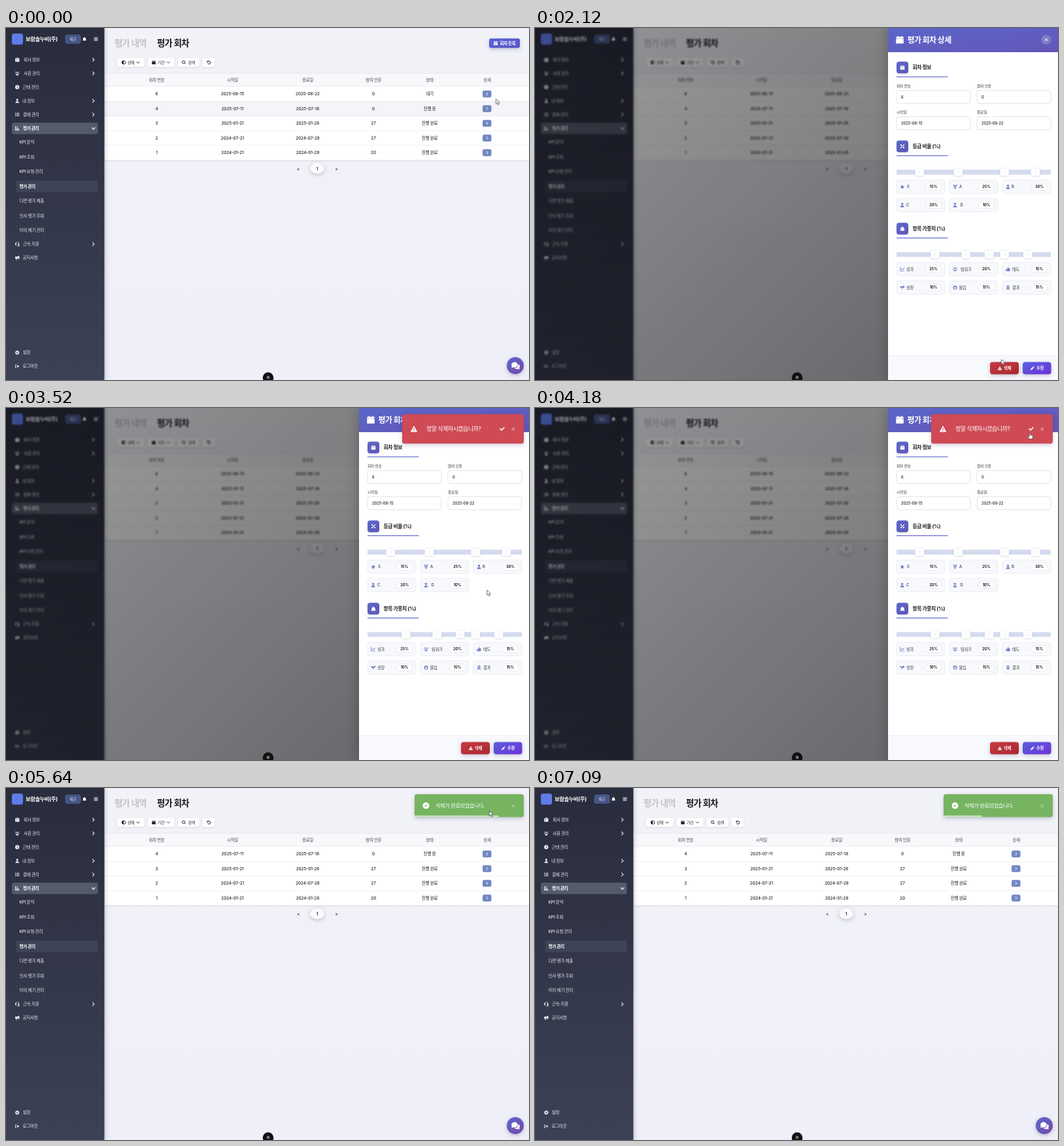
An HTML page that plays this animation: 800x539 px, repeating every 7.12 s.

```html
<!DOCTYPE html>
<html lang="ko">
<head>
<meta charset="utf-8">
<title>평가 회차</title>
<style>
html, body { margin: 0; width: 100%; height: 100%; overflow: hidden; background: #f0f1f8; }
#stage { position: relative; width: 800px; height: 539px; overflow: hidden; }
#stage > * { position: absolute; left: 0; top: 0; width: 800px; height: 539px; }
svg { display: block; overflow: visible; }
text { font-family: Inter, "Noto Sans CJK KR", "Noto Sans CJK", sans-serif; white-space: pre; }
text.ko { letter-spacing: -.05em; }
.soft { filter: drop-shadow(0 1px 1.5px rgba(40, 45, 80, .12)); }
.lift { filter: drop-shadow(0 2px 3px rgba(40, 45, 80, .25)); }

#shade {
  background: linear-gradient(135deg, rgba(0, 0, 0, .38), rgba(0, 0, 0, .6));
  backdrop-filter: blur(1.25px);
}
#shade, #drawer, #ask, #done, #cursor, #before, #after, #rowHover, #del, #bar, .arrow, .hand {
  animation: 7120ms linear infinite;
}
#shade { animation-name: shade; }
#drawer { animation-name: drawer; }
#ask { animation-name: ask; }
#done { animation-name: done; }
#ask, #done { animation-timing-function: cubic-bezier(.215, .61, .355, 1); }
#bar { animation-name: bar; transform-origin: 625px 0; }
#cursor { animation-name: cursor; animation-timing-function: ease-in-out; }
#before { animation-name: before; }
#after { animation-name: after; }
#rowHover { animation-name: rowHover; }
#del { animation-name: del; }
.arrow { animation-name: arrow; }
.hand { animation-name: hand; }
#before, #after, #rowHover, .arrow, .hand { animation-timing-function: step-end; }

@keyframes shade {
  0%, 2% { opacity: 0; }
  8%, 59.6% { opacity: 1; }
  64.4%, 100% { opacity: 0; }
}
@keyframes drawer {
  0%, 2% { transform: translateX(290px); animation-timing-function: cubic-bezier(.2, .7, .3, 1); }
  8.6%, 59.6% { transform: none; animation-timing-function: ease; }
  64.9%, 100% { transform: translateX(290px); }
}
@keyframes ask {
  0%, 34.3% { opacity: 0; transform: translateX(1250px); }
  40.6% { opacity: 1; transform: translateX(-10.4px); }
  42.15% { transform: translateX(4.2px); }
  43.75% { transform: translateX(-2.1px); }
  44.8%, 59% { opacity: 1; transform: none; animation-timing-function: ease; }
  61.1% { opacity: 1; transform: translateX(-8.3px); animation-timing-function: ease; }
  69.5%, 100% { opacity: 0; transform: translateX(833px); }
}
@keyframes done {
  0%, 64.55% { opacity: 0; transform: translateX(1250px); }
  70.9% { opacity: 1; transform: translateX(-10.4px); }
  72.45% { transform: translateX(4.2px); }
  74.05% { transform: translateX(-2.1px); }
  75.1%, 100% { opacity: 1; transform: none; }
}
@keyframes bar {
  0%, 68.1% { transform: none; }
  100% { transform: scaleX(.344); }
}
@keyframes cursor {
  0% { transform: translate(749.5px, 108.5px); }
  1.5%, 17.4% { transform: translate(736px, 99px); }
  29.8% { transform: translate(713.5px, 507.5px); }
  32.5%, 42% { transform: translate(715px, 514px); }
  57%, 58.8% { transform: translate(757px, 38px); }
  61%, 70% { transform: translate(757px, 36px); }
  79.2% { transform: translate(739.5px, 35px); }
  84.5%, 100% { transform: translate(733px, -14px); }
}
@keyframes before { 0% { visibility: visible; } 64.6%, 100% { visibility: hidden; } }
@keyframes after { 0% { visibility: hidden; } 64.6%, 100% { visibility: visible; } }
@keyframes rowHover { 0% { visibility: visible; } 1%, 100% { visibility: hidden; } }
@keyframes del { 0%, 31.5% { transform: none; } 33%, 43% { transform: translateY(-1px); } 44.5%, 100% { transform: none; } }
@keyframes arrow {
  0% { visibility: visible; } 1.2% { visibility: hidden; } 3% { visibility: visible; }
  32% { visibility: hidden; } 43% { visibility: visible; }
  55.5% { visibility: hidden; } 72%, 100% { visibility: visible; }
}
@keyframes hand {
  0% { visibility: hidden; } 1.2% { visibility: visible; } 3% { visibility: hidden; }
  32% { visibility: visible; } 43% { visibility: hidden; }
  55.5% { visibility: visible; } 72%, 100% { visibility: hidden; }
}
</style>
</head>
<body>
<div id="stage"></div>
<script>
// Icons live in a 10 x 10 box, filled even-odd.
const disc = (x, y, r) => `M${x} ${y - r}a${r} ${r} 0 1 1 0 ${2 * r}a${r} ${r} 0 1 1 0 ${-2 * r}z`;
const ICONS = {
  office: 'M0 2h4V0h3v2h3v8H0zM2 4v1h1.4V4zM2 7v1h1.4V7zM5 4v1h1.4V4z',
  users: disc(5, 3.2, 1.7) + disc(1.6, 2, 1.2) + disc(8.4, 2, 1.2) + 'M1.8 9.5a3.2 3.6 0 0 1 6.4 0zM0 6a1.8 1.8 0 0 1 2.8-1.6L1.6 6.2zM10 6a1.8 1.8 0 0 0-2.8-1.6l1.2 1.8z',
  clock: disc(5, 5, 5) + 'M4.4 2v3.4l2.2 1.5.6-.9-1.7-1.2V2z',
  user: disc(5, 2.5, 2.5) + 'M.7 10a4.3 4.3 0 0 1 8.6 0z',
  tasks: 'M0 .8h2v2H0zM3.5 1.1H10v1.4H3.5zM0 4h2v2H0zM3.5 4.3H10v1.4H3.5zM0 7.2h2v2H0zM3.5 7.5H10v1.4H3.5z',
  chart: 'M0 0h1.5v8.5H10V10H0zM3 1.5h4v1.3H3zM3 4h2.5v1.3H3zM3 6.3h6v1.3H3z',
  headset: 'M5 0a5 5 0 0 0-5 5v2.5h3v-4H1.6a3.5 3.5 0 0 1 6.8 0H7v4h1.5v1H5V10h5V5a5 5 0 0 0-5-5z',
  horn: 'M10 0v8L5 6H3.5l.8 4H2L1.3 6H0V2h5z',
  gear: 'M4 0h2l.4 1.6 1.5-.9 1.4 1.4-.9 1.5L10 4v2l-1.6.4.9 1.5-1.4 1.4-1.5-.9L6 10H4l-.4-1.6-1.5.9L.7 7.9l.9-1.5L0 6V4l1.6-.4L.7 2.1 2.1.7l1.5.9z' + disc(5, 5, 1.7),
  exit: 'M0 1h4v1.4H1.4v5.2H4V9H0zM3.5 4h3V1.8L10 5 6.5 8.2V6h-3z',
  bell: 'M4.4 0h1.2v1A3.2 3.2 0 0 1 8.3 4v2.2L9.5 8H.5l1.2-1.8V4A3.2 3.2 0 0 1 4.4 1zM3.7 8.6h2.6a1.3 1.3 0 0 1-2.6 0z',
  bars: 'M0 1h10v1.5H0zM0 4.25h10v1.5H0zM0 7.5h10V9H0z',
  cal: 'M2 0h1.4v1.2h3.2V0H8v1.2h2V3H0V1.2h2zM0 3.7h10V10H0z',
  calCheck: 'M2 0h1.4v1.2h3.2V0H8v1.2h2V3H0V1.2h2zM0 3.7h10V10H0zM2.6 6.8l1.7 1.8 3.2-3.2-.7-.7-2.5 2.5-1-1z',
  half: disc(5, 5, 5) + 'M5 1.3v7.4a3.7 3.7 0 0 0 0-7.4z',
  search: disc(4.2, 4.2, 4.2) + disc(4.2, 4.2, 2.8) + 'M7.6 6.6 10 9 9 10 6.6 7.6z',
  undo: 'M0 0h1.4v2A5 5 0 1 1 1 8l1.2-.9A3.5 3.5 0 1 0 2.4 3h2.1v1.4H0z',
  chat: 'M3.8 .8a3.8 3.2 0 1 1-1.3 6.2L0 7.8l.9-1.9A3.8 3.2 0 0 1 3.8 .8zM8.2 3.2A3.2 2.8 0 0 1 9.4 7.6L10 9.6 7.8 8.9A4 3 0 0 1 3.6 8 4.6 4 0 0 0 8.2 3.2z',
  x: 'M1.3 0 5 3.7 8.7 0 10 1.3 6.3 5 10 8.7 8.7 10 5 6.3 1.3 10 0 8.7 3.7 5 0 1.3z',
  check: 'M0 5.2 1.4 3.8 3.8 6.2 8.6 1.4 10 2.8 3.8 9z',
  warn: 'M5 .3 10 9.5H0zM4.4 3.3v3.2h1.2V3.3zM4.4 7.2v1.2h1.2V7.2z',
  pen: 'M0 10l.6-3L6 1.6 8.4 4 3 9.4zM6.8.8l.8-.8L10 2.4l-.8.8z',
  star: 'M5 0l1.5 3.3 3.5.4-2.6 2.4.7 3.6L5 7.9 1.9 9.7l.7-3.6L0 3.7l3.5-.4z',
  medal: 'M0 0h2.6L5 3.2 7.4 0H10L7.2 4.3a3 3 0 1 1-4.4 0z' + disc(5, 6.6, 1.4),
  slash: disc(5, 2.5, 2.5) + 'M.7 10a4.3 4.3 0 0 1 8.6 0zM0 1.4l.8-.8L10 8.6l-.8.8z',
  percent: 'M8.6 0 10 1.4 1.4 10 0 8.6z' + disc(2, 2, 1.7) + disc(8, 8, 1.7),
  weight: 'M3 2.6a2 2 0 1 1 4 0h1.5L10 10H0l1.5-7.4zM4 2.6h2a1 1 0 1 0-2 0z',
  line: 'M0 0h1.4v8.6H10V10H0zM2.4 6 4.8 3.4 6.4 5 9 1.6l1 .8-3.4 4.4L4.8 5 3.4 7z',
  thumb: 'M0 4.5h2.2V10H0zM3 4.5 5 0h1.2v3.5H10L9 10H3z',
  sprout: 'M4.3 10V6A4 4 0 0 1 0 2h2a3.6 3.6 0 0 1 3 2 4 4 0 0 1 3.5-3H10a4.5 4.5 0 0 1-4.3 5v4z',
  focus: disc(5, 5.4, 4.6) + disc(5, 6, 2.4) + 'M3 0h4v2H3z',
  award: disc(5, 3.3, 3.3) + disc(5, 3.3, 1.5) + 'M2.5 6.2 1 10h2.2L5 7.4 6.8 10H9L7.5 6.2 5 7z'
};

const rect = (x, y, w, h, fill, r = 0, extra = '') =>
  `<rect x="${x}" y="${y}" width="${w}" height="${h}" rx="${r}" fill="${fill}" ${extra}/>`;
const icon = (name, x, y, size, fill = '#fff') =>
  `<path d="${ICONS[name]}" fill="${fill}" fill-rule="evenodd" transform="translate(${x - size / 2} ${y - size / 2}) scale(${size / 10})"/>`;
const label = (str, x, y, size, fill, weight = 500, anchor = 'start') => {
  const ko = /[가-힣]/.test(str);
  const px = ko ? size : size * .94;
  return `<text class="${ko ? 'ko' : ''}" x="${x}" y="${y + px * .36}" font-size="${px}" font-weight="${weight}" fill="${fill}" text-anchor="${anchor}">${str.replace('<', '&lt;')}</text>`;
};
const mid = (str, x, y, size, fill, weight) => label(str, x, y, size, fill, weight, 'middle');
const stroke = (d, color, w) =>
  `<path d="${d}" fill="none" stroke="${color}" stroke-width="${w}" stroke-linecap="round" stroke-linejoin="round"/>`;
const right = (x, y, s, color, w = 1.1) => stroke(`M${x - s / 2} ${y - s}l${s} ${s}l${-s} ${s}`, color, w);
const down = (x, y, s, color, w = 1.1) => stroke(`M${x - s} ${y - s / 2}l${s} ${s}l${s} ${-s}`, color, w);
const group = (attrs, body) => `<g ${attrs}>${body}</g>`;
const layer = (id, body) => `<svg id="${id}" viewBox="0 0 800 539">${body}</svg>`;
const grad = (id, a, b, x = 1, y = 1) =>
  `<linearGradient id="${id}" x2="${x}" y2="${y}"><stop stop-color="${a}"/><stop offset="1" stop-color="${b}"/></linearGradient>`;

const INK = '#1b1c20', MENU = '#e6e8ef';

function sidebar() {
  const items = [
    ['office', '회사 정보', 27, 48.5, 1], ['users', '사원 관리', 27, 69.5, 1], ['clock', '근태 관리', 25.5, 90.5],
    ['user', '내 정보', 25, 111.5, 1], ['tasks', '결재 관리', 26, 132.5, 1], ['headset', '근속 지원', 26, 331, 1],
    ['horn', '공지사항', 25.5, 352], ['gear', '설정', 25.5, 497], ['exit', '로그아웃', 25.5, 518]
  ];
  const subs = ['KPI 분석', 'KPI 조회', 'KPI 요청 관리', '평가 관리', '다면 평가 제출', '인사 평가 조회', '이의 제기 관리'];
  return rect(0, 0, 150.5, 539, 'url(#side)', 0, 'style="filter:drop-shadow(1px 0 3px rgba(30,35,60,.25))"')
    + rect(9, 8.5, 17, 17, '#5f7cea', 3.5)
    + label('보람솔누비(주)', 30, 17, 8.3, '#fff', 700)
    + rect(91, 10.5, 23, 13, '#46568a', 2.5, 'stroke="#5a6ba0" stroke-width=".6"') + mid('퇴근', 102.5, 17, 5.4, '#fff')
    + icon('bell', 120, 17, 6.4) + icon('bars', 137.5, 17, 6)
    + rect(9, 145, 131.5, 17.5, '#565b6c', 3)
    + icon('chart', 17.2, 153.5, 6.4) + label('평가 관리', 26, 153.5, 6.67, '#fff', 700) + down(133.7, 153.8, 2.4, '#fff', 1.2)
    + rect(15.5, 233.5, 125, 18, '#3e4357', 3)
    + items.map(([ic, s, x, y, more]) =>
      icon(ic, 17.2, y, 6.4, MENU) + label(s, x, y, 6.67, MENU) + (more ? right(133.7, y, 2.4, MENU) : '')).join('')
    + subs.map((s, i) => label(s, 20.5, 174.7 + i * 22.52, 6.67, i == 3 ? '#fff' : MENU, i == 3 ? 700 : 500)).join('');
}

const ROWS = [
  ['6', '2025-08-15', '2025-08-22', '0', '대기'], ['4', '2025-07-11', '2025-07-18', '0', '진행 중'],
  ['3', '2025-01-21', '2025-01-28', '27', '진행 완료'], ['2', '2024-07-21', '2024-07-28', '27', '진행 완료'],
  ['1', '2024-01-21', '2024-01-28', '20', '진행 완료']
];
const COLS = [230.5, 346.5, 461.5, 562, 648, 736];

function list(rows) {
  const end = 89.7 + rows.length * 22.48;
  return rect(151, 70, 649, end - 70, '#fff', 0, 'class="soft"')
    + rect(151, 69.5, 649, 20.2, '#f8f8fb') + rect(151, 69.2, 649, .6, '#e6e7ee')
    + ['회차 번호', '시작일', '종료일', '참여 인원', '상태', '상세'].map((s, i) => mid(s, COLS[i], 79.5, 6.5, '#4a4c55')).join('')
    + rows.map((row, i) => {
      const y = 101 + i * 22.48;
      return rect(151, y - 11.5, 649, .6, '#e6e7ee')
        + row.map((s, c) => mid(s, COLS[c], y, 6.67, INK)).join('')
        + rect(729, y - 5.3, 13.5, 10.6, '#7288c2', 2.5) + right(736, y, 1.9, '#fff', 1);
    }).join('')
    + mid('<', 447, end + 13.2, 6.67, INK, 600) + mid('>', 505.5, end + 13.2, 6.67, INK, 600)
    + `<ellipse class="lift" cx="476" cy="${end + 12.8}" rx="10.7" ry="8.3" fill="#fafafd"/>`
    + mid('1', 476, end + 13.2, 6.67, INK, 600);
}

function page() {
  const pill = (x, w) => rect(x, 46, w, 13.5, '#fff', 3, 'class="soft"');
  return `<defs>${grad('side', '#292c3c', '#3c4155', 0)}${grad('bg', '#f2f3f8', '#eeeff8', 0)}
    ${grad('add', '#5c69d8', '#5950c6')}${grad('head', '#5a66c9', '#6456b8')}${grad('tile', '#5b69c9', '#5f55b8')}
    ${grad('red', '#c63a42', '#ab2830')}${grad('violet', '#5a5fe0', '#6d33d6')}${grad('bubble', '#5a68cc', '#7548a8')}</defs>`
    + rect(0, 0, 800, 539, 'url(#bg)')
    + label('평가 내역', 166, 23.5, 13.33, '#c2c3c8', 700) + label('평가 회차', 231, 23.5, 13.33, '#17181c', 700)
    + rect(739, 16, 47, 14.5, 'url(#add)', 3, 'class="lift"') + icon('calCheck', 749, 23.2, 6)
    + label('회차 등록', 755.5, 23.2, 6.5, '#fff', 700)
    + pill(170, 41.5) + icon('half', 180, 52.7, 6, INK) + label('상태', 186, 52.7, 6, INK) + down(202, 52.9, 2, INK, .9)
    + pill(217, 40.5) + icon('cal', 226, 52.7, 5.6, INK) + label('기간', 232, 52.7, 6, INK) + down(248.5, 52.9, 2, INK, .9)
    + pill(263, 32.5) + icon('search', 272, 52.7, 5.8, INK) + label('검색', 278.5, 52.7, 6, INK)
    + pill(301, 18.5) + icon('undo', 310.2, 52.7, 5.4, INK)
    + group('id="before"', list(ROWS)) + group('id="after"', list(ROWS.slice(1)))
    + rect(151, 112.3, 649, 22.4, 'rgba(60,65,130,.05)', 0, 'id="rowHover"')
    + sidebar()
    + '<circle class="lift" cx="779" cy="517" r="13" fill="url(#bubble)"/>' + icon('chat', 779.3, 517, 13);
}

function section(ic, title, y) {
  return rect(553, y - 9, 18, 18, 'url(#tile)', 4, 'class="soft"') + icon(ic, 562, y, 6.6)
    + label(title, 577.5, y, 7.8, INK, 700) + rect(553, y + 13.8, 78.5, 1.1, '#5a60c6');
}
function field(name, value, x, y) {
  return label(name, x, y, 5.83, '#3c3e46') + rect(x, y + 7.2, 113, 20, '#fff', 4, 'stroke="#d9dce4" stroke-width=".8"')
    + label(value, x + 7, y + 17.2, 6.1, INK);
}
function weights(y, cards) {
  let sum = 0;
  const thumbs = cards.slice(0, -1).map(([, , , v]) => {
    const x = 553 + 236 * (sum += v) / 100;
    return rect(x - 6.8, y - 6, 13.6, 12, '#fff', 2.5, 'class="soft" stroke="#e6e8f0" stroke-width=".5"')
      + rect(x - .3, y - 2, .6, 4, '#d4d7e2');
  });
  return rect(553, y - 3.6, 236, 7.4, '#d5dbee', 1) + thumbs.join('')
    + cards.map(([ic, s, tx, v], i) => {
      const x = 553 + i % 3 * 80.9, cy = y + 22.5 + 28 * Math.floor(i / 3);
      return rect(x, cy - 10.2, 74, 20.4, '#f8f9fc', 4, 'stroke="#e3e6ee" stroke-width=".7"')
        + icon(ic, x + 8.7, cy, 6.6, '#6c7dc8') + label(s, tx, cy, 6.3, '#3c3e46')
        + rect(x + 44.2, cy - 5.5, 24.8, 11, '#fff', 5.5, 'stroke="#dfe2ea" stroke-width=".7"')
        + mid(v + '%', x + 56.6, cy, 5.9, INK, 700);
    }).join('');
}
function drawer() {
  return rect(540, 0, 260, 539, '#fff', 0, 'style="filter:drop-shadow(-3px 0 8px rgba(0,0,0,.2))"')
    + rect(540, 0, 260, 37, 'url(#head)') + icon('cal', 558, 18, 11.6) + rect(554.5, 15.4, 7, 1.2, '#fff')
    + label('평가 회차 상세', 569.5, 18.2, 12, '#fff', 700)
    + '<circle cx="782" cy="18" r="7.6" fill="#fff" fill-opacity=".2"/>' + icon('x', 782, 18, 4.6)
    + section('cal', '회차 정보', 60.5)
    + field('회차 번호', '6', 553, 88.5) + field('참여 인원', '0', 676, 88.5)
    + field('시작일', '2025-08-15', 553, 128.6) + field('종료일', '2025-08-22', 676, 128.6)
    + section('percent', '등급 비율 (%)', 181.2)
    + weights(220.6, [['star', 'S', 569, 15], ['medal', 'A', 649, 25], ['user', 'B', 729, 30], ['user', 'C', 568, 20], ['slash', 'D', 650.5, 10]])
    + section('weight', '항목 가중치 (%)', 307.2)
    + weights(346.8, [['line', '성과', 568, 25], ['users', '팀워크', 651, 20], ['thumb', '태도', 730, 15],
      ['sprout', '성장', 568, 10], ['focus', '몰입', 648.5, 15], ['award', '결과', 730, 15]])
    + rect(540, 501.5, 260, 37.5, '#f8f9fc') + rect(540, 501.2, 260, .7, '#e8eaf0')
    + group('id="del"', rect(696, 511.5, 44, 18.7, 'url(#red)', 4, 'class="lift"') + icon('warn', 711, 520.8, 6.4) + label('삭제', 717, 520.8, 6.3, '#fff', 700))
    + rect(746, 511.5, 43.5, 18.7, 'url(#violet)', 4, 'class="lift"') + icon('pen', 761, 520.8, 6) + label('수정', 767, 520.8, 6.3, '#fff', 700);
}

const ask = () => rect(606, 9.5, 186, 45, '#cf4a55', 3.5, 'class="lift"')
  + icon('warn', 624, 32, 10.6) + label('정말 삭제하시겠습니까?', 643, 32, 8.9, '#fff', 400)
  + icon('check', 759, 31.8, 8) + icon('x', 775.8, 32.2, 5, 'rgba(255,255,255,.6)');

const done = () => '<clipPath id="round"><rect x="625" y="9.5" width="167" height="35" rx="3.5"/></clipPath>'
  + rect(625, 9.5, 167, 35, '#76b461', 3.5, 'class="lift"')
  + `<path d="${disc(642.5, 27, 5)}" fill="#fff"/>` + icon('check', 642.5, 27, 5.4, '#76b461')
  + label('삭제가 완료되었습니다.', 657, 27, 8.2, '#fff', 400) + icon('x', 775.8, 27.2, 5, 'rgba(255,255,255,.45)')
  + group('clip-path="url(#round)"', rect(625, 42.2, 167, 2.3, 'rgba(255,255,255,.7)', 0, 'id="bar"'));

const cursor = () =>
  '<path class="arrow" d="M0 0v8l1.8-1.7 1.4 3 1.3-.6-1.4-2.9h2.5z" fill="#fff" stroke="#333" stroke-width=".7"/>'
  + '<path class="hand" d="M-.9.8a.9.9 0 0 1 1.8 0v2.6l3 .7q.8.3.7 1.2l-.6 4.2H-.9L-3.2 6.2q-.4-1 .6-1.1l1.7 1z" fill="#fff" stroke="#333" stroke-width=".7" stroke-linejoin="round"/>';

document.getElementById('stage').innerHTML =
  layer('page', page()) + '<div id="shade"></div>' + layer('drawer', drawer())
  + layer('badge', '<circle cx="401" cy="535.5" r="8.3" fill="#111"/><circle cx="401" cy="535" r="2.4" fill="#777"/>')
  + layer('ask', ask()) + layer('done', done()) + layer('cursor', cursor());
</script>
</body>
</html>
```
